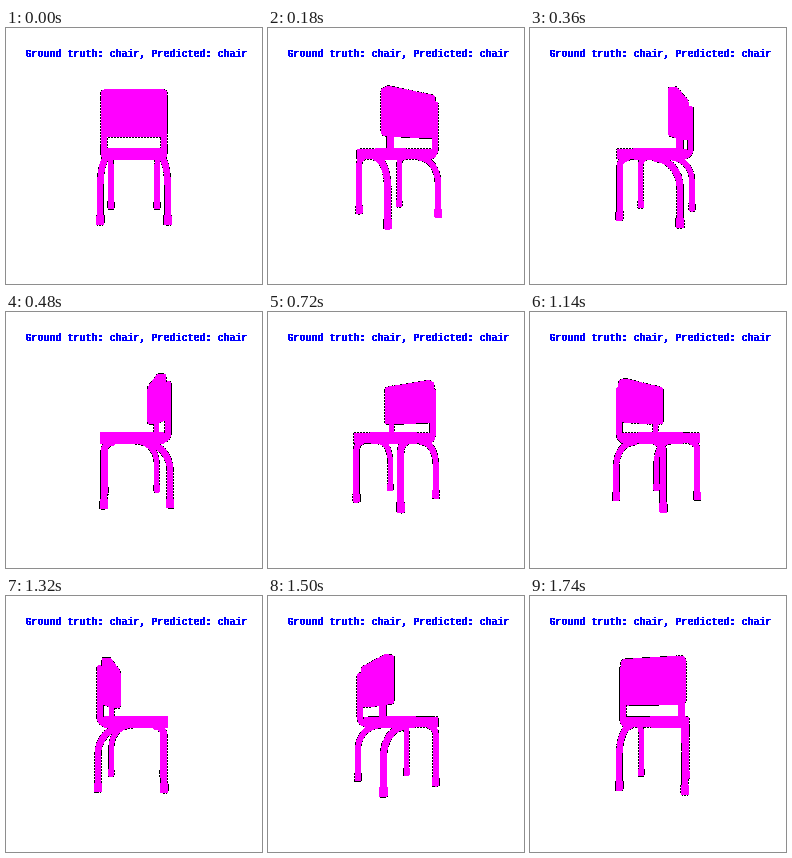
Animation, 256 px wide and 256 px high, one loop 1.8 s. Source, as a matplotlib script:

```python
import numpy as np
import matplotlib.pyplot as plt
from matplotlib.animation import FuncAnimation
from matplotlib.collections import PolyCollection

FRAMES, INTERVAL = 30, 60
DIST = 231            # camera distance
CX, CY = 128, 126     # image of the turning axis at eye level
RING = np.linspace(0, 2 * np.pi, 16, endpoint=False)
COS, SIN = np.cos(RING), np.sin(RING)

plt.rcParams["text.antialiased"] = False


def hull(points):
    """Convex outline of 2D points (monotone chain)."""
    pts = sorted(map(tuple, points))

    def chain(seq):
        out = []
        for x, y in seq:
            while len(out) > 1:
                (ax, ay), (bx, by) = out[-2:]
                if (bx - ax) * (y - ay) - (by - ay) * (x - ax) > 0:
                    break
                out.pop()
            out.append((x, y))
        return out[:-1]

    return np.array(chain(pts) + chain(pts[::-1]))


def project(points, turn):
    """Points are (side, height, depth), depth growing towards the backrest."""
    x, h, z = np.asarray(points, float).T
    c, s = np.cos(turn), np.sin(turn)
    scale = DIST / (DIST + x * s - z * c)
    return np.column_stack([CX + (x * c + z * s) * scale, CY - h * scale]), scale


def rounded(x0, x1, y0, y1, r):
    """Rectangle with round corners as point pairs."""
    a = np.linspace(0, np.pi / 2, 5)
    pts = []
    for k, (x, y) in enumerate([(x1 - r, y1 - r), (x0 + r, y1 - r),
                                (x0 + r, y0 + r), (x1 - r, y0 + r)]):
        b = a + k * np.pi / 2
        pts += list(zip(x + r * np.cos(b), y + r * np.sin(b)))
    return pts


def slabs():
    seat = [(x, h, z) for x, z in rounded(-28.7, 28.7, -32, 24, 4.5) for h in (-4.5, 4.5)]
    back = [(x, h, z) for x, h in rounded(-29.3, 29.3, 16, 57.3, 4) for z in (19, 25)]
    return [seat, back]


def foot(x, z):
    return [(x + 3 * c, h, z + 3 * s) for h in (-54.5, -61) for c, s in zip(COS, SIN)]


def tubes():
    t = np.linspace(0, np.pi / 2, 9)
    paths = []
    for side in (-1, 1):
        rear = [(side * (26.5 + 3 * np.sin(a)), -28 + 24 * np.cos(a), 6 + 23 * np.sin(a))
                for a in t] + [(side * 29.5, -57, 29)]
        front = [(side * 26, -12 + 8 * np.cos(a), -22 - 7.2 * np.sin(a))
                 for a in t[::2]] + [(side * 26, -57, -29.2)]
        post = [(side * 26.5, 48, 28)] + [
            (side * 26.5, 5 - 7 * np.sin(a), 21 + 7 * np.cos(a)) for a in t[::2]]
        paths += [(rear, 2.35), (front, 2.35), (post, 2.5)]
    return paths


SOLIDS = slabs() + [foot(s * x, z) for s in (-1, 1) for x, z in ((29.5, 29), (26, -29.2))]
TUBES = tubes()


def chair(turn):
    shapes = [hull(project(solid, turn)[0]) for solid in SOLIDS]
    for path, r in TUBES:
        pts, scale = project(path, turn)
        discs = [p + r * k * np.column_stack([COS, SIN]) for p, k in zip(pts, scale)]
        shapes += [hull(np.vstack(pair)) for pair in zip(discs, discs[1:])]
    return shapes


fig = plt.figure(figsize=(2.56, 2.56), dpi=100, facecolor="white")
ax = fig.add_axes([0, 0, 1, 1])
ax.set(xlim=(0, 256), ylim=(256, 0))
ax.axis("off")

# speckled dark rim, then the flat body on top
rim = PolyCollection([], facecolors="none", edgecolors="black", linewidths=0.8,
                     linestyles=[(0, (1, 1.4))], antialiaseds=False)
body = PolyCollection([], facecolors="#ff00ff", edgecolors="none", antialiaseds=False)
ax.add_collection(rim, autolim=False)
ax.add_collection(body, autolim=False)

# struck twice, one pixel apart, for a typewriter bold
for x in (19, 20):
    ax.text(x, 29, "Ground truth: chair, Predicted: chair", color="#0000ff",
            family="Liberation Mono", size=7.2, va="baseline")


def update(i):
    shapes = chair(2 * np.pi * i / FRAMES)
    rim.set_verts(shapes)
    body.set_verts(shapes)
    return rim, body


anim = FuncAnimation(fig, update, frames=FRAMES, interval=INTERVAL, repeat=True,
                     repeat_delay=0)
plt.show()
```
